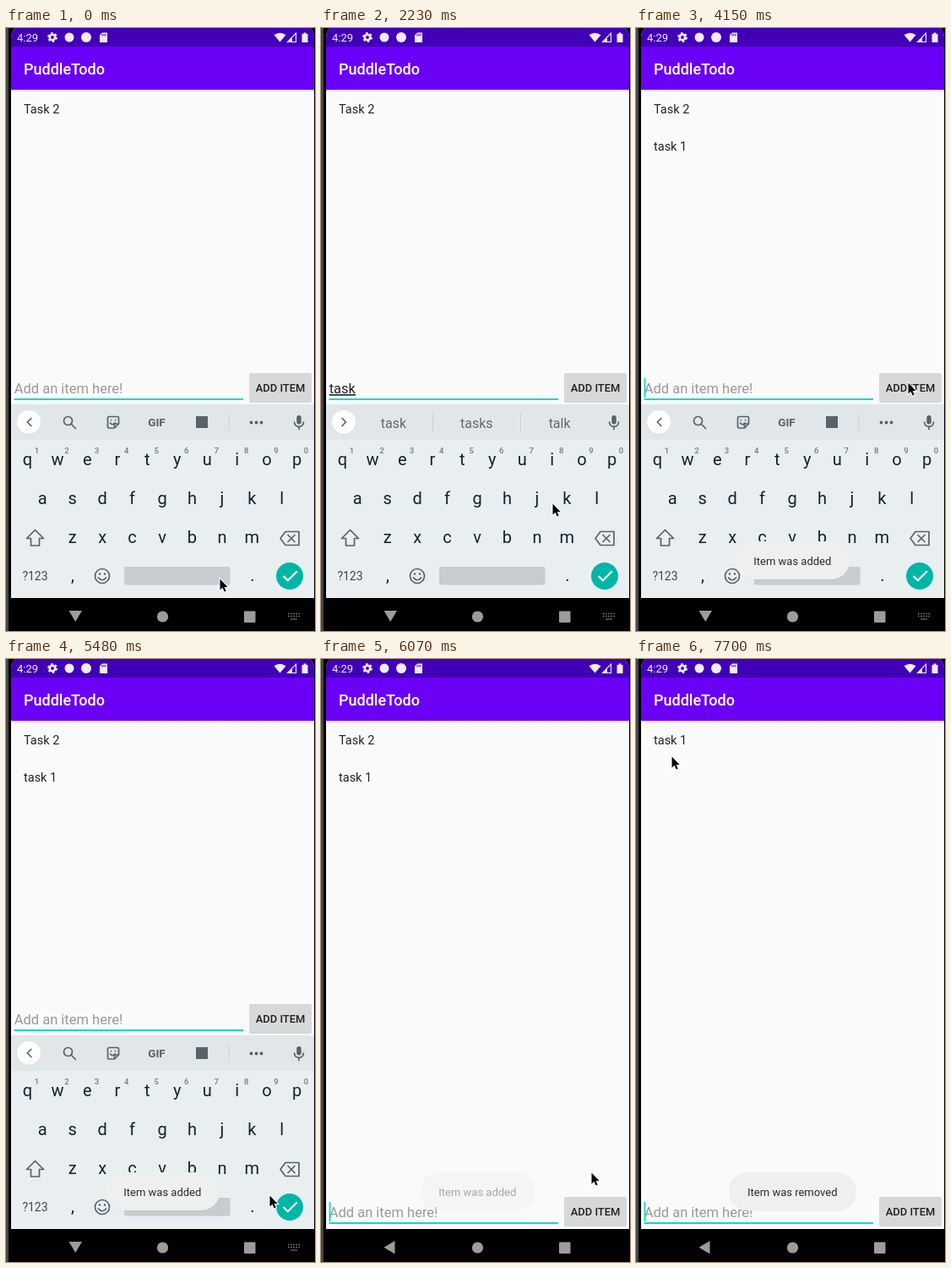
These frames come from a looping animation (366 by 713 pixels, 8 s). An HTML page:

```html
<!DOCTYPE html>
<html lang="en">
<head>
<meta charset="utf-8">
<title>To-do list</title>
<style>
  html, body { margin: 0; width: 100%; height: 100%; overflow: hidden; background: #000; }
  svg { display: block; width: 366px; height: 713px; font-family: Roboto, "Liberation Sans", sans-serif; }
  text { white-space: pre; }
  .mid { text-anchor: middle; }
  .item { font-size: 14.5px; fill: #232323; }
  .field { font-size: 16.5px; }
  .key { font-size: 20px; fill: #10242b; }
  .hint { font-size: 9.5px; fill: #707a80; font-weight: 500; }
  .word { font-size: 16px; fill: #5f6a70; }
  .line { fill: none; stroke: #56636a; stroke-width: 1.7; stroke-linecap: round; stroke-linejoin: round; }
  .grey { fill: #56636a; }
  .nav { fill: #9c9c9c; }
</style>
</head>
<body>
<svg viewBox="0 0 366 713">
  <defs>
    <linearGradient id="shade" x2="0" y2="1"><stop stop-color="#d4d4d4"/><stop offset="1" stop-color="#fafafa"/></linearGradient>
    <clipPath id="screen"><rect x="6" y="-4" width="359" height="717" rx="15"/></clipPath>
  </defs>
  <rect width="366" height="713"/>
  <rect width="3" height="713" fill="#464648"/>

  <g clip-path="url(#screen)">
    <rect x="6" width="359" height="674" fill="#fafafa"/>
    <rect x="6" y="73" width="359" height="3" fill="url(#shade)"/>
    <rect x="6" y="22" width="359" height="51" fill="#6b00f6"/>
    <rect x="6" width="359" height="22" fill="#4100b6"/>
  </g>
  <g fill="#f1ebfc">
    <text x="13" y="16" font-size="13">4:29</text>
    <circle cx="55" cy="11" r="3.2" fill="none" stroke="#f1ebfc" stroke-width="2.6"/>
    <circle cx="55" cy="11" r="5" fill="none" stroke="#f1ebfc" stroke-width="1.8" stroke-dasharray="2.62"/>
    <circle cx="75" cy="11" r="5.5"/>
    <circle cx="95" cy="11" r="6"/>
    <path d="M114 5.5H120V17H111V8.5Z"/>
    <path d="M114 7v2.5M116 7v2.5M118 7v2.5" stroke="#4100b6"/>
    <path d="M317.500 8.200Q324.500 3.200 331.500 8.200L324.500 16.500Z"/>
    <path d="M333.500 16.500L343.500 6V16.500Z" fill="none" stroke="#f1ebfc" stroke-width="1.1"/>
    <path d="M333 17L339 11V17Z"/>
    <path d="M350.500 7H352.500V5.500H355.500V7H357.500V17H350.500Z"/>
  </g>
  <text x="21" y="54.700" font-size="18" font-weight="500" fill="#fff">PuddleTodo</text>

  <text id="row1" class="item" x="21" y="101"></text>
  <text id="row2" class="item" x="21" y="145"></text>

  <g id="bar">
    <text id="entry" class="field" x="9.700" y="432"></text>
    <rect x="9.500" y="438" width="271.500" height="2" fill="#0bdacb"/>
    <rect id="caret" y="414" width="1.800" height="23" fill="#0bdacb"/>
    <rect x="288" y="409" width="74" height="34" rx="2" opacity=".16"/>
    <rect id="button" x="288" y="408" width="74" height="34" rx="2"/>
    <text class="mid" x="325" y="429.500" font-size="12.900" font-weight="500" fill="#202020">ADD ITEM</text>
  </g>

  <g id="board">
    <rect x="6" y="445" width="359" height="229" fill="#e9eef1"/>
    <rect x="6" y="445" width="359" height="42" fill="#e1e6e9"/>
    <circle cx="27" cy="466.700" r="14" opacity=".1"/>
    <circle cx="27" cy="466" r="14" fill="#fdfdfd"/>
    <path id="chevron" class="line"/>
    <g id="tools">
      <circle class="line" cx="73.500" cy="464.500" r="5"/>
      <path class="line" d="M77.500 468.500L82.500 473.500" stroke-width="2"/>
      <path class="line" d="M122 459.500H132Q133.500 459.500 133.500 461V468L128.500 473H122Q120.500 473 120.500 471.500V461Q120.500 459.500 122 459.500ZM133.500 468H128.500V473M123.500 467Q126 470.500 129 467M124.500 463.500v.2M129.500 463.500v.2"/>
      <text class="mid grey" x="178.500" y="471" font-size="13.500" font-weight="700">GIF</text>
      <rect class="grey" x="225" y="459" width="14" height="14"/>
      <path d="M264 456V476" stroke="#cbd1d5"/>
      <path class="line" d="M290.500 466.500h.01m6 0h.01m6 0h.01" style="stroke-width:3.800"/>
    </g>
    <g id="words"><path d="M132.500 456V478M236.500 456V478" stroke="#cbd1d5"/></g>
    <rect class="grey" x="344.300" y="458" width="5.400" height="10.500" rx="2.700"/>
    <path class="line" d="M341.500 466Q342 471.300 347 471.300T352.500 466M347 472V474.500"/>

    <g id="keys"></g>
    <path class="line" d="M34.500 593.500L44.500 603.500H39.500V612H29.500V603.500H24.500Z"/>
    <path class="line" d="M331 595.500H347V611.500H331L325 603.500ZM334 599.500L342 607.500M342 599.500L334 607.500"/>
    <text class="mid" x="34.500" y="653" font-size="14" fill="#3d4a50">?123</text>
    <text class="key mid" x="79" y="654">,</text>
    <text class="key mid" x="292" y="654">.</text>
    <circle class="line" cx="114" cy="648" r="8.500"/>
    <path class="line" d="M109.500 650Q114 655.500 118.500 650"/>
    <path class="line" d="M111 645.500h.01m6 0h.01" style="stroke-width:2.600"/>
    <rect x="140" y="637" width="125.500" height="21.500" rx="2" fill="#c7ccd1"/>
    <circle cx="336" cy="648" r="16" fill="#00b6a6"/>
    <path d="M328.500 648L333.800 653.300L344.800 642.300" fill="none" stroke="#fff" stroke-width="2.200"/>
  </g>

  <rect x="6" y="674" width="359" height="39"/>
  <path id="back" class="nav"/>
  <circle class="nav" cx="185.500" cy="696" r="6.600"/>
  <rect class="nav" x="282" y="689.500" width="13.500" height="13.500" rx="1"/>
  <g id="switcher" stroke="#8a8a8a">
    <path d="M334 692.500H348M334 695.500H348" stroke-width="1.500" stroke-dasharray="1.500 1.600"/>
    <path d="M337 699H345"/>
  </g>

  <g id="toast">
    <rect id="pillShade" y="608" height="45" rx="22.500" opacity=".03"/>
    <rect id="pill" y="607" height="45" rx="22.500" fill="#eeefef"/>
    <text id="note" class="mid" x="185.300" y="635" font-size="13" fill="#2b2b2b"></text>
  </g>

  <path id="mouse" d="M.5 .5V13.500L3.500 10.700L5.600 15.600L7.700 14.700L5.600 9.900H9.600Z" stroke="#fff" stroke-width="2" paint-order="stroke"/>
</svg>
<script>
const LOOP = 8000;
const TICK = 148;
const $ = id => document.getElementById(id);
const clamp = (v, lo, hi) => Math.min(hi, Math.max(lo, v));
const set = (id, attrs) => {
  for (const k in attrs) $(id).setAttribute(k, attrs[k]);
};
const show = (id, on) => set(id, { display: on ? "inline" : "none" });

function label(parent, cls, x, y, text) {
  const el = document.createElementNS("http://www.w3.org/2000/svg", "text");
  el.setAttribute("class", cls + " mid");
  el.setAttribute("x", x);
  el.setAttribute("y", y);
  el.textContent = text;
  $(parent).append(el);
}

// Keyboard letters, number hints and word suggestions
const PITCH = 35.45;
["qwertyuiop", "asdfghjkl", "zxcvbnm"].forEach((row, r) => {
  [...row].forEach((c, i) => {
    const x = 185 + (i - (row.length - 1) / 2) * PITCH, y = 517 + r * 46;
    label("keys", "key", x, y, c);
    if (!r) label("keys", "hint", x + 11, y - 14.5, (i + 1) % 10);
  });
});
["task", "tasks", "talk"].forEach((w, i) => label("words", "word", 86 + i * 98.3, 473, w));

// Moments, in ticks
const TYPE = 8, SPACE = 16, DIGIT = 18, PRESS = 25, ADD = 26, CLOSE = 40, REMOVE = 49;

// Pointer stops: tick, x, y
const stops = [
  [0, 253, 651], [3, 274, 562], [15, 274, 562], [20, 319, 379], [24, 322, 419], [28, 322, 419],
  [30, 184, 210], [31, 184, 210], [37, 312, 634], [39, 324, 643], [41, 320, 607],
  [44, 70, 38], [46, 42, 92], [50, 42, 92], [52, 42, 115]
];

function pointer(n) {
  const i = stops.findIndex(s => s[0] > n);
  if (i < 0) return stops[stops.length - 1].slice(1);
  const [a, b] = [stops[i - 1], stops[i]];
  const p = (n - a[0]) / (b[0] - a[0]);
  const ease = p * p * (3 - 2 * p);
  return [1, 2].map(k => a[k] + (b[k] - a[k]) * ease);
}

function entryText(n) {
  if (n >= ADD) return "";
  const word = clamp(n - TYPE + 1, 0, 4);
  const rest = clamp(Math.floor((n - SPACE) / 2) + 1, 0, 2);
  return "task 1".slice(0, word + rest);
}

// Half a second on, half a second off, restarted by each input
function caretOn(n) {
  const inputs = [-5.1, TYPE, TYPE + 3, DIGIT, PRESS - 0.1];
  const last = inputs.filter(k => k <= n).pop();
  return (n - last) * TICK % 1000 < 500;
}

// Fades in over three ticks, stays about two seconds, fades out
const fade = n => clamp(Math.min((n + 1) / 3, (16.2 - n) / 3), 0, 1);

function draw(t) {
  const n = Math.floor((t + 8) / TICK);
  const text = entryText(n);
  const removed = n >= REMOVE, open = n < CLOSE;
  const words = n >= TYPE && n < DIGIT;

  set("mouse", { transform: `translate(${pointer(n)})` });
  $("row1").textContent = removed ? "task 1" : "Task 2";
  $("row2").textContent = n >= ADD && !removed ? "task 1" : "";

  set("bar", { transform: `translate(0 ${open ? 0 : 228})` });
  const entry = $("entry");
  entry.textContent = text || "Add an item here!";
  set("entry", {
    fill: text ? "#222" : "#999",
    "text-decoration": text && n < SPACE ? "underline" : "none"
  });
  set("caret", { x: 9.6 + (text ? entry.getComputedTextLength() : 0) });
  show("caret", caretOn(n));
  set("button", { fill: n === PRESS || n === ADD ? "#c3c4c4" : "#d7d8d8" });

  show("board", open);
  show("switcher", open);
  show("tools", !words);
  show("words", words);
  set("chevron", { d: words ? "M25 461.500L29.500 466L25 470.500" : "M29.800 461.500L25.300 466L29.800 470.500" });
  set("back", { d: open ? "M74.500 689H90L82.250 702Z" : "M87.500 688V703.500L74.500 695.750Z" });

  const wide = removed ? 151 : 136.5;
  for (const id of ["pill", "pillShade"]) set(id, { x: 185.3 - wide / 2, width: wide });
  $("note").textContent = removed ? "Item was removed" : "Item was added";
  set("toast", { opacity: fade(n - (removed ? REMOVE : ADD)) });
}

const start = performance.now();
function tick() {
  draw((performance.now() - start) % LOOP);
  requestAnimationFrame(tick);
}
tick();
</script>
</body>
</html>
```
